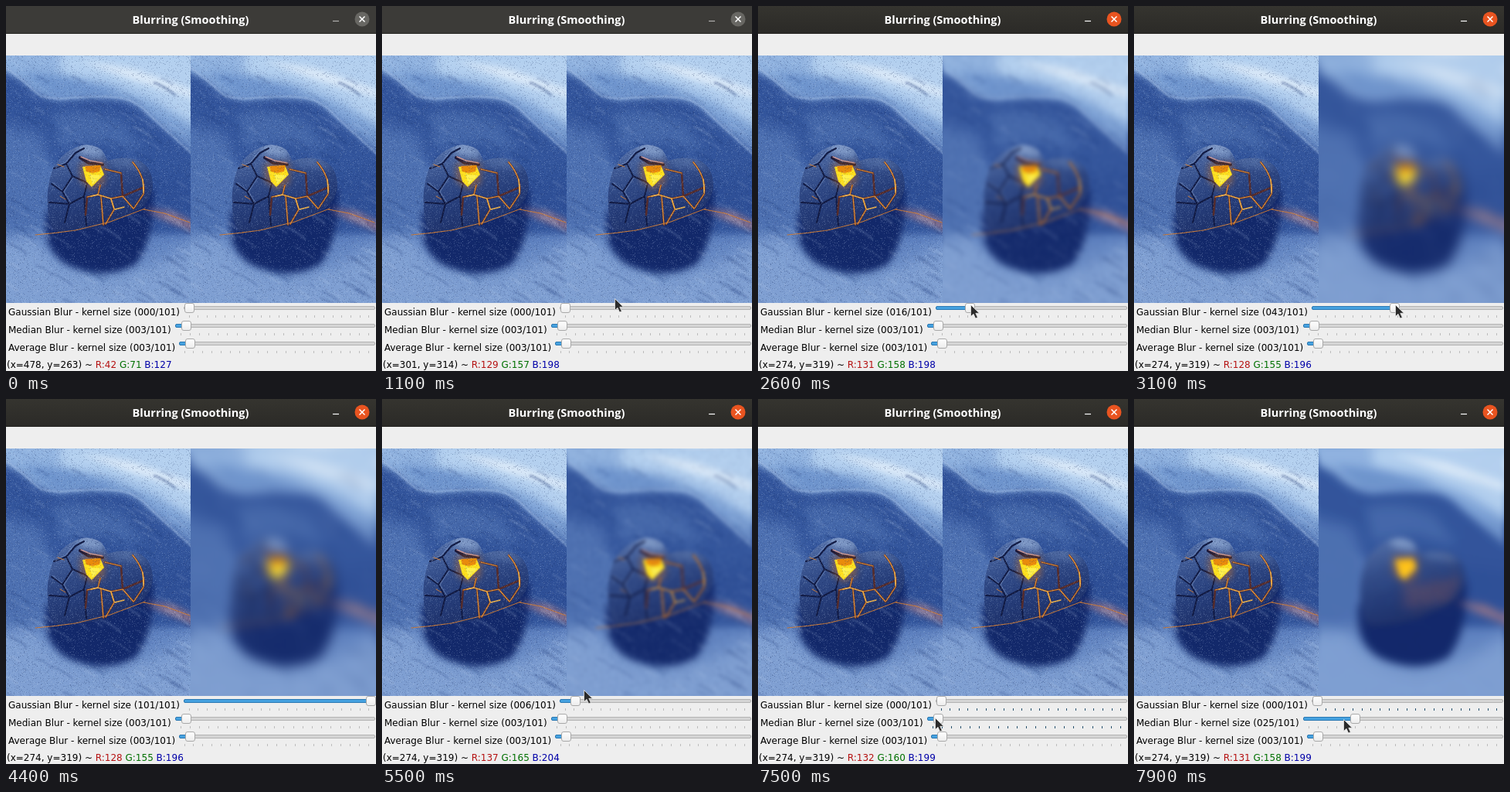
An HTML page with a canvas that plays this animation: 479 by 472 pixels, repeating every 8 s.

```html
<!DOCTYPE html>
<html lang="en">
<head>
<meta charset="utf-8">
<title>Blurring (Smoothing)</title>
<style>
  html, body { margin: 0; width: 100%; height: 100%; overflow: hidden; background: #eee; }
  canvas, svg { position: absolute; left: 0; top: 0; }
  canvas { top: 64px; }
  #after { left: 239px; }
  text { font: 12px "DejaVu Sans", sans-serif; white-space: pre; }
  .title { font: bold 14.5px "Open Sans", sans-serif; fill: #fff; text-anchor: middle; }
</style>
</head>
<body>
<canvas id="before" width="239" height="320"></canvas>
<canvas id="after" width="240" height="320"></canvas>
<svg width="479" height="472" viewBox="0 0 479 472">
  <defs>
    <linearGradient id="bar" x2="0" y2="1"><stop stop-color="#35342f"/><stop offset="1" stop-color="#2b2a27"/></linearGradient>
    <linearGradient id="knob" x2="0" y2="1"><stop stop-color="#fff"/><stop offset="1" stop-color="#ececec"/></linearGradient>
  </defs>
  <rect width="479" height="36" fill="url(#bar)"/>
  <circle cx="461" cy="17" r="9.5" fill="#e95420"/>
  <g id="inactive">
    <rect width="479" height="36" fill="#3c3b38"/>
    <circle cx="461" cy="17" r="9.5" fill="#686763"/>
  </g>
  <path d="M0 35.5H479" stroke="#252421"/>
  <text class="title" x="239" y="23">Blurring (Smoothing)</text>
  <path d="M457.5 13.5l7 7m0 -7l-7 7" stroke="#fff" stroke-width="1.5"/>
  <path id="minimise" d="M423 19.5h8" stroke="#fff" stroke-width="1.2"/>
  <g id="sliders"></g>
  <text x="1" y="468"><tspan id="pos"></tspan><tspan id="red" fill="#b51212"></tspan><tspan id="green" fill="#007000"></tspan><tspan id="blue" fill="#0000a8"></tspan></text>
  <path id="cursor" d="M.5 .5V15.5L4 12.3L6.6 18L9.3 16.8L6.8 11.3H11.5Z" fill="#2b2b2b" stroke="#e8e8e8" stroke-width=".8"/>
</svg>
<script>
const LOOP = 8000, STEP = 100;
const $ = id => document.getElementById(id);

// Keys are [time, ...values]; values are linear between keys.
const track = keys => t => {
  const i = keys.findIndex(k => k[0] > t);
  if (i < 0) return keys[keys.length - 1].slice(1);
  if (i === 0) return keys[0].slice(1);
  const a = keys[i - 1], b = keys[i], p = (t - a[0]) / (b[0] - a[0]);
  return a.slice(1).map((v, n) => v + (b[n + 1] - v) * p);
};

const pointer = track([
  [600, 500, 358], [700, 408, 358], [1200, 274, 383], [1300, 250, 387], [1400, 250, 387],
  [1500, 240, 387], [1600, 240, 387], [1700, 237, 386], [2300, 237, 386], [3100, 338, 386],
  [4100, 453, 385], [4200, 464, 385], [4300, 474, 384], [4400, 500, 384], [4800, 500, 384],
  [4900, 470, 388], [5500, 261, 376], [5600, 246, 376], [5700, 246, 376], [6000, 240, 386],
  [6200, 240, 386], [6500, 200, 405], [6900, 222, 418], [7100, 222, 418], [7300, 229, 412],
  [7500, 229, 412], [7900, 271, 414]
]);
const gaussian = track([
  [2300, 0], [3100, 43], [4200, 97], [4300, 101], [4800, 101], [4900, 98], [5500, 6],
  [5600, 2], [5700, 2], [5900, 0]
]);
const median = track([[7500, 3], [7900, 25]]);
const sigma = track([
  [2300, 0], [2400, 1], [3100, 6.8], [4800, 6.8], [5200, 6], [5500, 2.3], [5600, 0]
]);
const color = track([
  [600, 42, 71, 127], [700, 118, 147, 194], [1200, 132, 160, 199], [2300, 132, 160, 199],
  [3100, 128, 155, 196], [4900, 128, 155, 196], [5500, 137, 165, 204], [5600, 132, 160, 199],
  [7500, 132, 160, 199], [7900, 131, 158, 199]
]);
const active = track([[2000, 0], [2200, 1]]);

function makeCanvas(w, h) {
  return Object.assign(document.createElement('canvas'), { width: w, height: h });
}

function paintScene(detailed) {
  const cv = makeCanvas(240, 320), c = cv.getContext('2d');
  let seed = 7;
  const rand = () => (seed = (seed * 16807) % 2147483647) / 2147483647;
  const soft = (fill, blur, d) => {
    c.filter = blur ? `blur(${blur}px)` : 'none';
    c.fillStyle = fill;
    c.fill(new Path2D(d));
    c.filter = 'none';
  };
  const line = (stroke, width, d, blur = 0) => {
    c.filter = blur ? `blur(${blur}px)` : 'none';
    c.strokeStyle = stroke;
    c.lineWidth = width;
    c.stroke(new Path2D(d));
    c.filter = 'none';
  };
  const ramp = (x0, y0, x1, y1, ...stops) => {
    const g = c.createLinearGradient(x0, y0, x1, y1);
    stops.forEach((s, i) => g.addColorStop(i / (stops.length - 1), s));
    return g;
  };
  c.lineJoin = c.lineCap = 'round';
  c.translate(0, -64);

  // Dunes
  c.fillStyle = ramp(0, 64, 0, 384, '#93b5e1', '#7da2d6', '#5678b6', '#5f82c0', '#7f9fd1');
  c.fillRect(0, 64, 240, 320);
  soft('#b4d0ef', 7, 'M70 58H260V165L190 122L130 98L70 88Z');
  soft('#6e94cd', 5, 'M20 85L75 92L150 112L120 118L60 118Z');
  soft('#dceaf8', 4, 'M95 70L165 82L245 110V120L160 94Z');
  soft('#33559c', 4, 'M-20 76L20 96Q45 120 70 122Q120 117 150 121Q170 125 185 142L260 204V295H190L60 210L-20 155Z');
  soft('#4d70b1', 9, 'M-20 150L45 165L65 225L45 300L-20 305Z');
  soft('#4568aa', 7, 'M60 140Q110 130 150 150L180 190L120 175L70 185Z');
  soft('#7f9fd2', 10, 'M-20 298L40 300Q70 352 130 362L190 342L260 295V400H-20Z');
  soft('#2f5097', 7, 'M185 215L250 225V268L190 265Z');
  soft('#13296b', 4, 'M52 265Q45 318 82 336Q130 356 168 334Q194 300 191 235Z');
  soft('rgba(190,130,130,.65)', 4, 'M178 262L215 266L250 284V294L205 276Z');

  if (detailed) {
    line('rgba(180,206,240,.55)', 2, 'M-5 76L20 95L45 117L70 120Q120 115 150 119Q170 123 185 140L245 195', 1);
    for (let i = 0; i < 130; i++) {
      const x = rand() * 240, y = 66 + rand() * 318, len = 8 + rand() * 20;
      const tone = rand() < .5 ? 'rgba(205,225,250,.16)' : 'rgba(18,44,110,.18)';
      line(tone, 1 + rand() * 3, `M${x} ${y}q${len / 2} ${len / 6} ${len} ${len * .6}`, 1);
    }
  }

  // Stone heart
  const heart = 'M62 207Q74 190 88 184Q108 174 124 186L132 200Q151 193 173 200Q190 209 190 233Q188 252 174 261Q145 280 108 289L70 293Q57 291 55 270Q50 236 62 207Z';
  soft(ramp(95, 180, 125, 290, '#536fa8', '#354f8b', '#263d79', '#1d2f67'), detailed ? 0 : 2, heart);
  c.save();
  c.clip(new Path2D(heart));
  soft('rgba(139,165,207,.85)', 4, 'M88 181Q110 172 128 190L124 196L98 192Z');
  soft('rgba(100,128,180,.6)', 4, 'M134 198Q160 192 184 208L170 210L140 206Z');
  if (!detailed) soft('rgba(110,80,100,.5)', 6, 'M110 240L185 230L170 262L110 272Z');
  c.restore();

  if (detailed) {
    line('#111a43', 2, 'M62 210L78 204L90 190L101 184M78 204L86 220L73 240L59 230M86 220L104 228M73 240L82 256L101 246L105 229M82 256L76 280M56 254L82 256M101 246L104 284');
    line('rgba(160,185,225,.55)', .8, 'M64 209L77 202L88 189M87 222L75 240L84 254M60 228L72 238M104 180L118 184');
    line('#552c2c', 2.6, 'M105 247L119 244L136 249L151 246L165 262M136 249L140 263L129 282M128 211L149 216L151 246M164 202Q181 222 178 243L166 261M119 244L122 232M151 246L177 235M105 247L103 270M123 246L126 283');
    line('#df9138', 1.2, 'M105 247L119 244L136 249L151 246L165 262M136 249L140 263L129 282M164 202Q181 222 178 243L166 261M128 211L149 216M119 244L122 232M123 246L126 283');
    line('#f0b54c', 1.3, 'M110 246L119 244L136 249M136 250L140 262M177 224L178 241M141 263L153 260');
    line('#c87938', 1, 'M67 205L75 208M70 246L77 250M67 293L90 290L135 279L180 262M38 296L68 293M178 263L205 268L238 280');
    line('#1c1838', 4, 'M96 196L107 203L125 205');
    line('#c59496', 1.4, 'M97 195L109 200L125 203');
  }
  soft('rgba(225,120,20,.4)', 4, 'M96 203H128V230L110 238L96 225Z');
  soft(detailed ? '#ffdf1c' : '#ffc21a', detailed ? 0 : 2, 'M99 208L122 206L127 218L111 234L104 227Z');
  if (detailed) {
    soft('#e98b0c', 0, 'M102 207L123 206L121 214L112 216L104 214Z');
    soft('#fff04a', 0, 'M108 218L124 219L112 231Z');
    for (let i = 0; i < 17000; i++) {
      c.fillStyle = rand() < .5 ? 'rgba(215,230,255,.15)' : 'rgba(10,25,80,.17)';
      c.fillRect(Math.floor(rand() * 240), 64 + Math.floor(rand() * 320), 1, 1);
    }
  }

  // A stretched copy behind the picture keeps blurred borders opaque.
  const padded = makeCanvas(300, 380), p = padded.getContext('2d');
  p.drawImage(cv, 0, 0, 300, 380);
  p.drawImage(cv, 30, 30);
  return padded;
}

const photo = paintScene(true), smooth = paintScene(false);
$('before').getContext('2d').drawImage(photo, -30, -30);
const after = $('after').getContext('2d');

function drawAfter(blur, mix) {
  const layer = (image, radius, alpha) => {
    after.filter = radius > .05 ? `blur(${radius}px)` : 'none';
    after.globalAlpha = alpha;
    after.drawImage(image, -30, -30);
  };
  layer(photo, Math.max(blur, mix * 5), 1);
  if (mix > 0) layer(smooth, 3.5, mix * .9);
}

const pad = v => String(Math.round(v)).padStart(3, '0');

function makeSlider(name, left, row) {
  const y = 390.5 + row * 23, start = left + 6.5, scale = (471.5 - start) / 101;
  const g = document.createElementNS('http://www.w3.org/2000/svg', 'g');
  let ticks = '';
  for (let v = 0; v <= 100; v += 5) ticks += `M${Math.round(start + v * scale) + .5} ${y + 9.5}v3`;
  g.innerHTML = `<text x="3" y="${y + 9.5}"></text>
    <path d="${ticks}"/>
    <rect x="${left + .5}" y="${y - 2}" width="${477 - left}" height="4" rx="1.5" fill="#d5d5d5" stroke="#b3b3b3"/>
    <rect x="${left + .5}" y="${y - 2}" height="4" rx="1.5" fill="#46a2e0" stroke="#2c79b3"/>
    <rect y="${y - 6}" width="12" height="12" rx="2.5" fill="url(#knob)" stroke="#a9a9a9"/>`;
  $('sliders').append(g);
  const [label, marks, , fill, knob] = g.children;
  return (value, focused) => {
    const x = Math.round(start + value * scale) + .5;
    label.textContent = `${name} Blur - kernel size (${pad(value)}/101)`;
    marks.setAttribute('stroke', focused ? '#27516d' : '#bcbcbc');
    fill.setAttribute('width', x - left - 4);
    fill.setAttribute('visibility', value >= .5 ? 'visible' : 'hidden');
    knob.setAttribute('x', x - 6);
  };
}

const setGaussian = makeSlider('Gaussian', 230, 0);
const setMedian = makeSlider('Median', 219, 1);
const setAverage = makeSlider('Average', 224, 2);

function render(t) {
  const [x, y] = pointer(t), [m] = median(t), [on] = active(t);
  setGaussian(gaussian(t)[0], (t >= 2100 && t < 2400) || t >= 6400);
  setMedian(m, t >= 6500 && t < 7600);
  setAverage(3, false);
  drawAfter(sigma(t)[0], (m - 3) / 22);

  const spot = t < 700 ? [478, 263] : t < 1200 ? [x, y - 64] : [274, 319];
  $('pos').textContent = `(x=${Math.round(spot[0])}, y=${Math.round(spot[1])}) ~ `;
  const [r, g, b] = color(t).map(Math.round);
  $('red').textContent = `R:${r} `;
  $('green').textContent = `G:${g} `;
  $('blue').textContent = `B:${b}`;

  $('inactive').setAttribute('opacity', 1 - on);
  $('minimise').setAttribute('opacity', .6 + .4 * on);
  $('cursor').setAttribute('transform', `translate(${Math.round(x)} ${Math.round(y)})`);
}

const began = performance.now();
let shown = -1;
function tick() {
  const t = Math.floor((performance.now() - began) % LOOP / STEP) * STEP;
  if (t !== shown) render(shown = t);
  requestAnimationFrame(tick);
}
tick();
</script>
</body>
</html>
```
